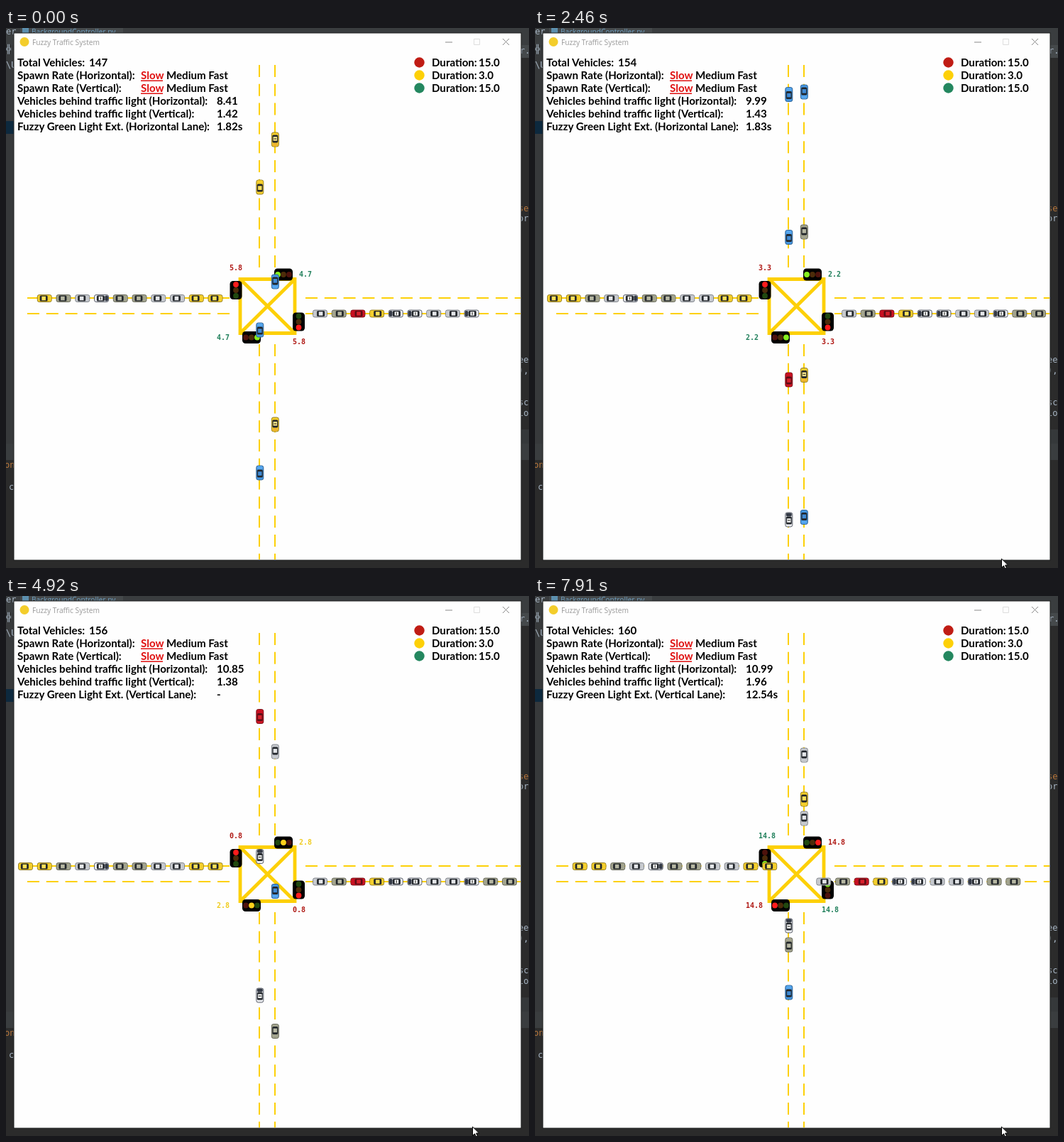
Animation, 737 px wide and 760 px high, one loop 7.99 s. Source, as an HTML page:

```html
<!DOCTYPE html>
<html lang="en">
<head>
<meta charset="utf-8">
<title>Fuzzy Traffic System</title>
<style>
  html, body { margin: 0; width: 100%; height: 100%; overflow: hidden; background: #2b2b2b; }
  svg { display: block; width: 100%; height: 100%; }
  text { white-space: pre; }
  .info { font: 700 15.1px Lato, "Open Sans", sans-serif; fill: #000; }
  .timer { font: 700 10px "DejaVu Sans Mono", monospace; }
  .code { font: 12px "DejaVu Sans Mono", monospace; fill: #a9b7c6; }
  .title { font: 10.2px "Open Sans", sans-serif; fill: #999; }
</style>
</head>
<body>
<svg id="stage" viewBox="0 0 737 760"></svg>
<script>
const LOOP = 7990, STEP = 76.85, LAST = 103;
const YELLOW_AT = 61, SWITCH_AT = 100;
const ROAD = '#fdd007';
const INK = { red: '#b01a16', yellow: '#f0cc20', green: '#21805c' };

const rect = (x, y, w, h, fill, more = '') =>
  `<rect x="${x}" y="${y}" width="${w}" height="${h}" fill="${fill}" ${more}/>`;
const text = (x, y, str, cls = 'info', more = '') =>
  `<text x="${x}" y="${y}" class="${cls}" ${more}>${str}</text>`;
const path = (d, stroke, width, more = '') =>
  `<path d="${d}" fill="none" stroke="${stroke}" stroke-width="${width}" ${more}/>`;

// Editor strips that show around the window
function editor() {
  const left = [[0, 9, 'er'], [0, 34, '╬'], [0, 56, '\\U'], [-2, 619, 'on'], [4, 650, 'c']];
  const right = [[724, 36, 'r.p'], [722, 258, 'se'], [722, 272, 'or'], [722, 471, 'ee'],
    [722, 486, '),'], [722, 531, 'sc'], [722, 546, 'lo']];
  return rect(0, 0, 737, 760, '#2b2b2b')
    + rect(0, 0, 737, 24, '#3a3d3f') + rect(20, 0, 145, 8, '#45494b')
    + rect(0, 24, 12, 562, '#37393b') + rect(0, 131, 12, 18, '#0d293e')
    + rect(725, 24, 12, 18, '#45494b')
    + rect(725, 565, 12, 20, '#35383a') + rect(0, 585, 737, 23, '#3a3d3f')
    + rect(23, 0, 9, 8, '#5c8fae')
    + text(36, 9, 'BackgroundController.py', 'title', 'style="fill:#6f9fc0"')
    + [...left, ...right].map(([x, y, s]) =>
      text(x, y, s, 'code', s === 'se' || s === 'on' ? 'style="fill:#b9773c"' : '')).join('');
}

function frame() {
  return rect(11, 7, 715, 742, '#fefefe', 'stroke="#1d1e1f" stroke-width="1"')
    + '<circle cx="26" cy="19.5" r="6.5" fill="#f3cd2b"/>'
    + text(37, 24, 'Fuzzy Traffic System', 'title')
    + path('M619 20H629M700 15L709 24M709 15L700 24', '#888', 1)
    + path('M659.5 15.5h8v8h-8z', '#ddd', 1);
}

function roads() {
  const dashes = 'M357 52V338M379 52V338M357 445V748M379 445V748'
    + 'M30 380H316M30 402H316M422 380H725M422 402H725';
  return path(dashes, ROAD, 2, 'stroke-dasharray="17 9.8"')
    + path('M330 353.5H407V429.5H330ZL407 429.5M407 353.5L330 429.5', ROAD, 4.8);
}

function labels() {
  const rows = ['Total Vehicles:', 'Spawn Rate (Horizontal):', 'Spawn Rate (Vertical):',
    'Vehicles behind traffic light (Horizontal):', 'Vehicles behind traffic light (Vertical):', ''];
  const rate = y => text(190, y, 'Slow', 'info', 'style="fill:#e01010"')
    + rect(190, y + 1.5, 31, 1.5, '#e01010') + text(226, y, 'Medium Fast');
  const durations = [['#c01c14', '15.0'], ['#fdd007', '3.0'], ['#24875f', '15.0']];
  return rows.map((s, i) => text(16, 54 + 18 * i, s, 'info', i === 5 ? 'id="lane"' : '')).join('')
    + rate(72) + rate(90)
    + text(117, 54, '', 'info', 'id="total"')
    + ['queueH', 'queueV', 'extension'].map((id, i) =>
      text(297, 108 + 18 * i, '', 'info', `id="${id}"`)).join('')
    + durations.map(([color, value], i) =>
      `<circle cx="582.5" cy="${48.5 + 18 * i}" r="7.2" fill="${color}"/>`
      + text(600, 54 + 18 * i, 'Duration:') + text(666, 54 + 18 * i, value)).join('');
}

// Traffic lights: x, y, turn, timer x, timer y, axis
const LIGHTS = [
  [324, 369, 0, 315, 341, 'h'], [412.5, 413.5, 180, 404, 445, 'h'],
  [391, 347, 90, 413, 350, 'v'], [346, 435.5, -90, 297, 439, 'v'],
];
const LAMPS = [['red', '#ff1c1c', '#4e120c'], ['yellow', '#ffd21c', '#4c2c0a'], ['green', '#86f01e', '#20480f']];

const lights = () => LIGHTS.map(([x, y, turn]) =>
  `<g transform="translate(${x} ${y}) rotate(${turn})">`
  + rect(-8.5, -13, 17, 26, '#000', 'rx="4.5"')
  + LAMPS.map((lamp, i) => `<circle class="lamp" cy="${8 * i - 8}" r="3.9"/>`).join('')
  + '</g>').join('');
const timers = () => LIGHTS.map(([, , , x, y]) => text(x, y, '', 'timer')).join('');

// Cars face up: body, roof, hood, outline
const PAINT = {
  yellow: ['#f5cf2c', '#ffe257', '#f5cf2c', '#8a7420'],
  taxi: ['#f5cf2c', '#ffe98a', '#eeb52e', '#8a7420'],
  blue: ['#4596e0', '#3f8bd6', '#56a6ee', '#2b5c8c'],
  red: ['#cf1424', '#d8202c', '#c81022', '#6e0c14'],
  olive: ['#a3a48e', '#b6b7a2', '#a3a48e', '#5f6053'],
  silver: ['#c6c9ce', '#e4e6e9', '#c6c9ce', '#777b82'],
  patrol: ['#eceef2', '#f4f5f7', '#343a46', '#4a4f5a'],
};
function car(kind) {
  const [body, roof, hood, edge] = PAINT[kind];
  const glass = kind === 'red' ? '#5c0d16' : '#22262b';
  return rect(-5, -10, 10, 20, body, `rx="2.6" stroke="${edge}" stroke-width=".9"`)
    + rect(-4, -9.4, 8, 4.6, hood, 'rx="1.8"')
    + rect(-4, -4.4, 8, 11, glass, 'rx="1.6"')
    + rect(-2.7, -1.7, 5.4, 5.6, roof)
    + (kind === 'taxi' || kind === 'patrol' ? rect(-1.8, .4, 3.6, 1.2, '#3a3a30') : '');
}

// Vertical traffic: direction, paint, start position, first step, stop line
const VERTICAL = [
  [1, 'taxi', 558, 0], [1, 'blue', 357, 0], [1, 'taxi', 157, 0], [1, 'olive', -44.5, 9],
  [1, 'blue', -241.5, 29], [1, 'silver', -438, 48, 313], [1, 'yellow', -634, 68, 286],
  [1, 'silver', -835, 87, 259],
  [-1, 'yellow', 224, 0], [-1, 'blue', 425, 0], [-1, 'blue', 626, 0], [-1, 'red', 826.5, 9],
  [-1, 'patrol', 1023.5, 29], [-1, 'patrol', 1219, 48, 464], [-1, 'olive', 1415, 68, 491],
  [-1, 'blue', 1617, 87, 518],
];
const EAST = 'yellow yellow silver silver olive olive patrol silver olive yellow yellow'.split(' ');
const WEST = 'silver olive red yellow patrol patrol silver silver patrol olive olive'.split(' ');

const vehicles = [];
VERTICAL.forEach(([dir, kind, start, from, stop]) => vehicles.push({
  kind, from, turn: dir > 0 ? 180 : 0,
  at: n => {
    const y = start + dir * along(n, TRAVEL);
    return [dir > 0 ? 379.3 : 357.8, stop ? dir * Math.min(dir * y, dir * stop) : y];
  },
}));
EAST.forEach((kind, i) => vehicles.push({
  kind, from: i === 10 ? 9 : 0, turn: 90,
  at: n => [295 - 26.75 * i + rollOut(n), 380.5],
}));
WEST.forEach((kind, i) => vehicles.push({
  kind, from: i === 9 ? 9 : i === 10 ? 29 : 0, turn: -90,
  at: n => [442.5 + 26.7 * i - rollOut(n) + (i === 9 ? Math.max(0, 12 - n) * 9.5 : 0), 402],
}));

// Values over steps, linear between the marks
const MARKS = [0, 14, 32, 44, 64, 79, 103];
const TRAVEL = [0, 143.5, 331.5, 452, 657, 813, 1059];
const QUEUE_H = [8.41, 9.13, 9.99, 10.39, 10.85, 11, 10.99];
const QUEUE_V = [1.42, 1.45, 1.43, 1.37, 1.38, 1.49, 1.96];
const EXTENSION = [1.82, 1.83, 1.83, 1.81, 1.8, 1.8, 1.8];
const GREEN_LEFT = [4.73, 3.66, 2.24, 1.3, -.236, -1.388, -3.231];

function along(n, values) {
  let i = 0;
  while (i < MARKS.length - 2 && n >= MARKS[i + 1]) i++;
  return values[i] + (values[i + 1] - values[i]) * (n - MARKS[i]) / (MARKS[i + 1] - MARKS[i]);
}
function rollOut(n) { return Math.max(0, n - SWITCH_AT + .5) * 10.2; }

function signals(n) {
  if (n >= SWITCH_AT) {
    const left = 15 - (n - SWITCH_AT) * STEP / 1000;
    return { h: ['green', left], v: ['red', left] };
  }
  const green = along(n, GREEN_LEFT);
  const h = ['red', Math.max(0, green + 1.04)];
  const v = n < YELLOW_AT ? ['green', Math.max(0, green)]
    : ['yellow', Math.max(0, 3 - (n - YELLOW_AT) * STEP / 1000)];
  return { h, v };
}

const stage = document.getElementById('stage');
stage.innerHTML = '<clipPath id="view"><path d="M12 34H725V748H12z"/></clipPath>'
  + editor() + frame() + '<g clip-path="url(#view)">' + roads() + lights()
  + vehicles.map(v => `<g class="car">${car(v.kind)}</g>`).join('')
  + '</g>' + labels() + timers()
  + '<path id="pointer" d="M657.5 747v12.5l3-2.7 2.2 4.8 2-1-2.1-4.6h4z" fill="#fff" stroke="#000" stroke-width="1"/>';

const $ = id => document.getElementById(id);
const carNodes = [...stage.querySelectorAll('.car')];
const lampNodes = [...stage.querySelectorAll('.lamp')];
const timerNodes = [...stage.querySelectorAll('.timer')];

function draw(n) {
  vehicles.forEach((v, i) => {
    const [x, y] = v.at(n);
    carNodes[i].setAttribute('visibility', n >= v.from ? 'visible' : 'hidden');
    carNodes[i].setAttribute('transform', `translate(${x} ${y}) rotate(${v.turn})`);
  });
  const state = signals(n);
  LIGHTS.forEach((light, i) => {
    const [color, left] = state[light[5]];
    LAMPS.forEach(([name, lit, dim], j) =>
      lampNodes[3 * i + j].setAttribute('fill', name === color ? lit : dim));
    timerNodes[i].textContent = left.toFixed(1);
    timerNodes[i].setAttribute('fill', INK[color]);
  });
  $('total').textContent = 147 + vehicles.filter(v => v.from && v.from <= n).length;
  $('queueH').textContent = along(n, QUEUE_H).toFixed(2);
  $('queueV').textContent = along(n, QUEUE_V).toFixed(2);
  $('lane').textContent = `Fuzzy Green Light Ext. (${n < YELLOW_AT ? 'Horizontal' : 'Vertical'} Lane):`;
  $('extension').textContent = n < YELLOW_AT ? along(n, EXTENSION).toFixed(2) + 's'
    : n < SWITCH_AT ? '-' : '12.54s';
  $('pointer').setAttribute('visibility', n >= 5 ? 'visible' : 'hidden');
}

const begin = performance.now();
let shown = -1;
function tick() {
  const t = (performance.now() - begin) % LOOP;
  const n = Math.min(LAST, Math.floor((t + 14) / STEP));
  if (n !== shown) draw(shown = n);
  requestAnimationFrame(tick);
}
tick();
</script>
</body>
</html>
```
